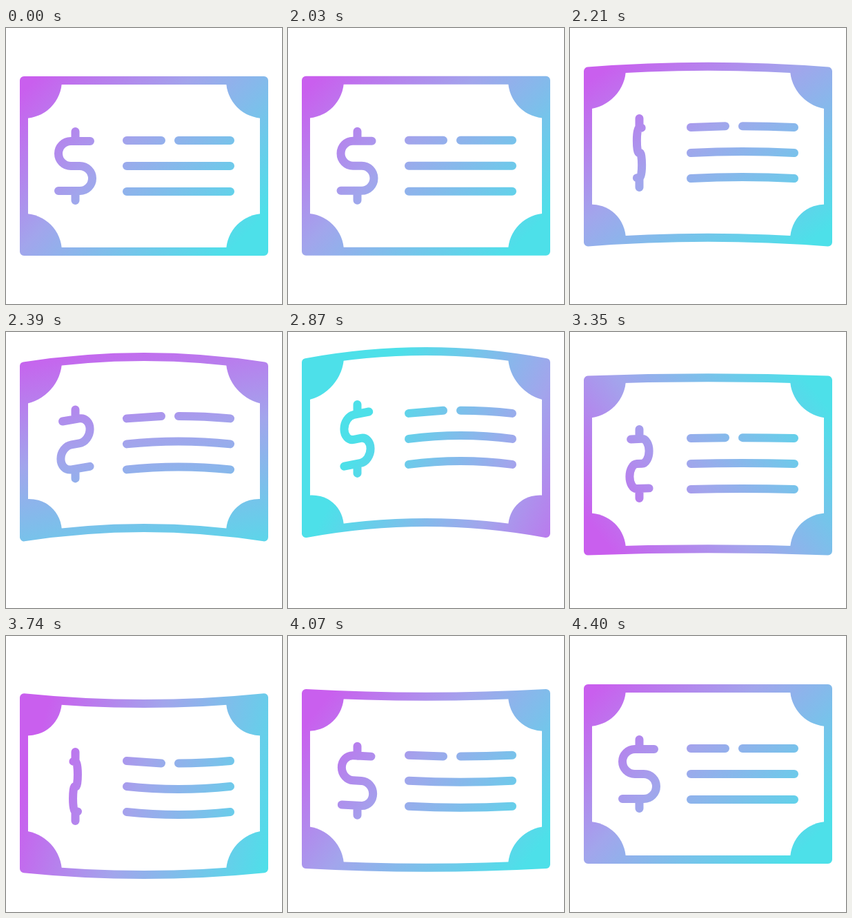
An HTML page with a canvas for the animation above (4430 ms loop, 400 by 400 pixels).

```html
<!DOCTYPE html>
<html lang="en">
<head>
<meta charset="utf-8">
<title>Waving certificate</title>
<style>
  html, body { margin: 0; width: 100%; height: 100%; overflow: hidden; background: #fff; }
  canvas { display: block; width: 400px; height: 400px; }
</style>
</head>
<body>
<canvas id="stage" width="400" height="400"></canvas>
<script>
const ctx = document.getElementById('stage').getContext('2d');
const LOOP = 4430, REST = 2000, STEP = 30, MOVE = 2400;
const HIGH = -48, LOW = 22.2;

// Keys are [time, value, slope].
const SPIN = [[0, 0, .0022], [390, .83, .00208], [870, 1.784, .00195],
  [1350, 2.695, .00192], [1740, 3.455, .0018], [2400, 4, 0]];
const GRADIENT_SHIFT = [[0, -41, 0], [390, -40, 0], [870, -108, 0],
  [1350, -22, .05], [1740, -2, 0], [2400, -41, 0]];

const clamp = x => Math.min(1, Math.max(0, x));
const smooth = x => x * x * (3 - 2 * x);

// Timing curve with control points (x1, 0) and (x2, 1).
function ease(x, x1, x2) {
  let lo = 0, hi = 1;
  for (let i = 0; i < 30; i++) {
    const s = (lo + hi) / 2, r = 1 - s;
    if (3 * x1 * s * r * r + 3 * x2 * s * s * r + s * s * s < x) lo = s; else hi = s;
  }
  return smooth(hi);
}

function spline(keys, t) {
  let i = 0;
  while (i < keys.length - 2 && t > keys[i + 1][0]) i++;
  const [ta, a, ma] = keys[i], [tb, b, mb] = keys[i + 1];
  const d = tb - ta, s = (t - ta) / d, r = 1 - s;
  return a + (b - a) * smooth(s) + d * s * r * (ma * r - mb * s);
}

// Vertical travel of the middle of the sheet.
function lift(t) {
  if (t === 0) return 0;
  if (t < 880) return HIGH * ease(clamp(t / 720), .33, .2);
  if (t < 1765) return HIGH + (LOW - HIGH) * smooth((t - 880) / 885);
  return LOW * (1 - smooth(clamp((t - 1765) / 635)));
}

function gradient(t) {
  const angle = Math.PI / 4 + 2 * Math.PI * ease(t / MOVE, .33, .38);
  const shift = spline(GRADIENT_SHIFT, t);
  const at = d => [200 + Math.cos(angle) * d, 200 + Math.sin(angle) * d];
  const g = ctx.createLinearGradient(...at(shift - 160), ...at(shift + 215));
  g.addColorStop(0, '#c95fee');
  g.addColorStop(.427, '#a2a5ec');
  g.addColorStop(1, '#4de0e9');
  return g;
}

function drawSheet(mid) {
  const edge = mid * (mid < 0 ? .665 : .6), bow = 2 * mid - edge;
  const frame = new Path2D();
  frame.moveTo(26, 76 + edge);
  frame.quadraticCurveTo(200, 76 + bow, 374, 76 + edge);
  frame.lineTo(374, 324 + edge);
  frame.quadraticCurveTo(200, 324 + bow, 26, 324 + edge);
  frame.closePath();

  // The corner discs lean along with the bent edge.
  const lean = (mid - edge) * .0096;
  ctx.save();
  ctx.clip(frame);
  for (const x of [26, 374]) {
    for (const y of [76, 324]) {
      const disc = new Path2D(), corner = new Path2D();
      disc.arc(0, 0, 55, 0, 2 * Math.PI);
      corner.addPath(disc, new DOMMatrix([1, x < 200 ? lean : -lean, 0, 1, x, y + edge]));
      ctx.fill(corner);
    }
  }
  ctx.restore();
  ctx.stroke(frame);
}

function drawLines(mid, ends) {
  const bow = mid < 0 ? mid * 1.04 : mid;
  const gapY = ends + (bow - ends) * .85;
  ctx.beginPath();
  ctx.moveTo(175, 163 + ends);
  ctx.lineTo(225, 163 + gapY);
  ctx.moveTo(250, 163 + gapY);
  ctx.quadraticCurveTo(288, 163 + gapY, 325, 163 + ends);
  for (const y of [200, 237]) {
    ctx.moveTo(175, y + ends);
    ctx.quadraticCurveTo(250, y + 2 * bow - ends, 325, y + ends);
  }
  ctx.stroke();
}

function drawDollar(mid, drop, turn) {
  const slope = mid * .0042;
  ctx.save();
  ctx.transform(turn, slope * turn, 0, 1, 100.5, 200 + drop);
  ctx.beginPath();
  ctx.moveTo(0, -50);
  ctx.lineTo(0, -36);
  ctx.moveTo(21.5, -36);
  ctx.lineTo(-6.5, -36);
  ctx.arc(-6.5, -18, 18, -Math.PI / 2, Math.PI / 2, true);
  ctx.lineTo(6.5, 0);
  ctx.arc(6.5, 18, 18, -Math.PI / 2, Math.PI / 2);
  ctx.lineTo(-24.5, 36);
  ctx.moveTo(0, 36);
  ctx.lineTo(0, 50);
  ctx.restore(); // the stroke keeps its full width while the sign turns
  ctx.stroke();
}

function draw(now) {
  const elapsed = Math.max(0, now % LOOP - REST);
  const t = Math.min(MOVE, Math.floor(elapsed / STEP) * STEP);
  const mid = lift(t);
  const ends = mid * (mid < 0 ? .94 : .82);

  ctx.fillStyle = '#fff';
  ctx.fillRect(0, 0, 400, 400);
  ctx.fillStyle = ctx.strokeStyle = gradient(t);
  ctx.lineWidth = 12;
  ctx.lineCap = ctx.lineJoin = 'round';
  drawSheet(mid);
  drawLines(mid, ends);
  drawDollar(mid, ends, Math.cos(Math.PI * spline(SPIN, t)));
}

const start = performance.now();
function tick() {
  draw(performance.now() - start);
  requestAnimationFrame(tick);
}
tick();
</script>
</body>
</html>
```
